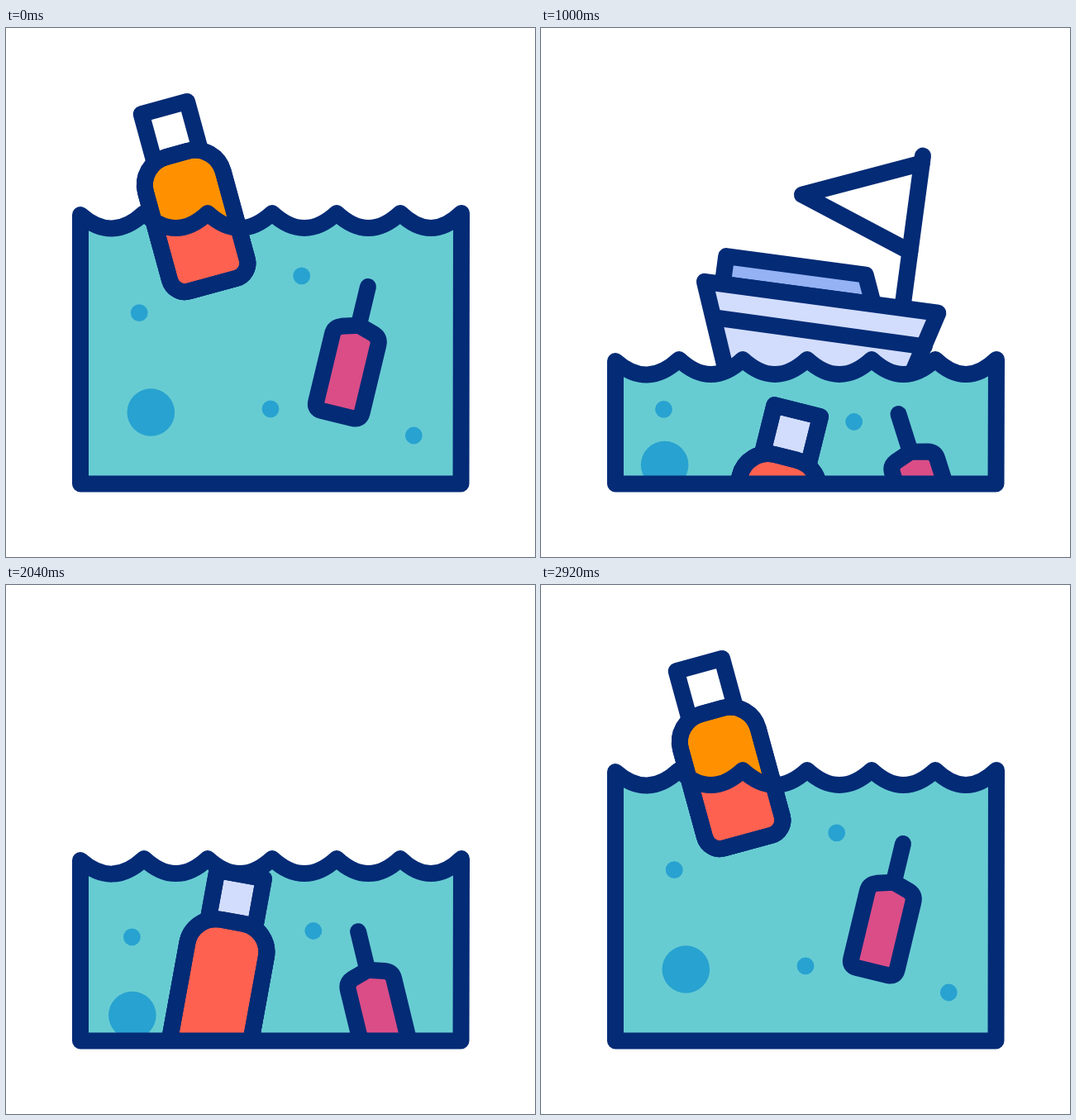
Write an HTML page with a canvas that moves like this. It is 640 px wide and 640 px high and loops after 3000 ms.

```html
<!DOCTYPE html>
<html lang="en">
<head>
<meta charset="utf-8">
<title>Tide</title>
<style>
  html, body { margin: 0; height: 100%; overflow: hidden; background: #fff; }
  canvas { display: block; width: 640px; height: 640px; }
</style>
</head>
<body>
<canvas id="stage" width="640" height="640"></canvas>
<script>
const ctx = document.getElementById('stage').getContext('2d');
const NAVY = '#032b76', WATER = '#67ccd2', BUBBLE = '#28a2d0', PALE = '#d2ddfd',
      CABIN = '#94b2f4', ORANGE = '#ff9100', RED = '#ff6150', PINK = '#db4d87';
const LOOP = 3000, STEP = 40, FLOOR = 551.5;
const CRESTS = [90, 167, 244, 322, 400, 477, 551];

const mix = (a, b, p) => a + (b - a) * p;

function ease(t, from, to) {
  const u = Math.min(1, Math.max(0, (t - from) / (to - from)));
  return u * u * (3 - 2 * u);
}

// 0 at rest, 1 once sunk, 0 again after rising
const dip = (t, down, sunk, up, back) => ease(t, down, sunk) - ease(t, up, back);

function line(points) {
  const path = new Path2D();
  points.forEach(([x, y]) => path.lineTo(x, y));
  return path;
}

function closed(points) {
  const path = line(points);
  path.closePath();
  return path;
}

// Bottle around its pivot
const body = new Path2D();
body.roundRect(-48.5, -47.6, 97, 164, [35, 35, 19, 19]);
const neck = line([[-28.7, -47.6], [-28.7, -105.6], [28.7, -105.6], [28.7, -47.6]]);

// Small bottle with a stick, around its pivot
const stick = line([[0, -83], [0, -35]]);
const vial = new Path2D('M0-35L-20-29Q-28.5-26-28.5-17V67Q-28.5 76-19.5 76H19.5Q28.5 76 28.5 67V-17Q28.5-26 20-29Z');

const hull = closed([[186, 331], [471, 331], [438, 450], [232, 450]]);
const band = line([[204, 372.5], [460, 373.5]]);
const cabin = closed([[208, 331], [208, 297], [378, 297], [392, 331]]);
const mast = line([[427.5, 145], [427.5, 331]]);
const flag = line([[427.5, 154], [289, 211], [427.5, 262]]);

function tank(level) {
  const path = new Path2D();
  path.moveTo(90, level + 2);
  CRESTS.slice(1).forEach((x, i) => {
    path.quadraticCurveTo((CRESTS[i] + x) / 2, level + 36, x, level);
  });
  path.lineTo(550.5, FLOOR);
  path.lineTo(90, FLOOR);
  path.closePath();
  return path;
}

function shape(path, fill) {
  if (fill) {
    ctx.fillStyle = fill;
    ctx.fill(path);
  }
  ctx.stroke(path);
}

function placed(x, y, degrees, draw) {
  ctx.save();
  ctx.translate(x, y);
  ctx.rotate(degrees * Math.PI / 180);
  draw();
  ctx.restore();
}

function clipped(path, draw) {
  ctx.save();
  ctx.clip(path);
  draw();
  ctx.restore();
}

function drawBoat(t) {
  const rise = dip(t, 200, 840, 1766, 2428);
  const rock = t < 980 ? 7.85 * ease(t, 200, 840)
    : 1.65 + 6.2 * Math.cos((Math.min(t, 1942) - 980) / 481 * 2 * Math.PI);
  placed(328, 405 + 675 * (1 - rise), rock, () => {
    ctx.translate(-328, -411);
    shape(mast);
    shape(flag);
    shape(cabin, CABIN);
    shape(hull, PALE);
    shape(band);
  });
}

function drawBubble(x, y, r) {
  ctx.fillStyle = BUBBLE;
  ctx.beginPath();
  ctx.arc(x, y, r, 0, 2 * Math.PI);
  ctx.fill();
}

function drawBubbles(t, sink) {
  const big = dip(t, 250, 777, 1790, 2920);
  const near = dip(t, 169, 758, 1762, 2487);
  const low = dip(t, 169, 758, 1840, 2620);
  drawBubble(mix(175.3, 149.6, big), mix(465, 528.5, big), 28.8);
  drawBubble(mix(161.2, 148.5, sink), mix(344.7, 461.3, sink), 10.4);
  drawBubble(mix(357.7, 378.7, near), mix(299.8, 476.5, near), 10.4);
  drawBubble(320 - 6 * low, 460.8 + 150 * low, 10.4);
  drawBubble(493.3 - 6 * low, 493 + 150 * low, 10.4);
}

function drawBottles(sea, sink, turn) {
  const bottle = draw =>
    placed(mix(219.2, 284.7, sink), mix(198.4, 565.6, sink), mix(-15.3, 14, turn), draw);
  bottle(() => shape(body, ORANGE));
  clipped(sea, () => bottle(() => {
    shape(neck, PALE);
    shape(body, RED);
  }));
  bottle(() => {
    shape(neck);
    shape(body);
  });
  placed(mix(418.6, 457.4, sink), mix(393.7, 546.2, sink), mix(13.5, -17.5, turn), () => {
    shape(vial, PINK);
    shape(stick);
  });
}

const aboveFloor = new Path2D();
aboveFloor.rect(0, 0, 640, FLOOR);

function render(t) {
  const sea = tank(mix(224, 401, dip(t, 140, 727, 1748, 2428)));
  const sink = dip(t, 205, 832, 1790, 2473);
  const turn = dip(t, 205, 832, 1790, 2920);

  ctx.clearRect(0, 0, 640, 640);
  ctx.lineWidth = 20;
  ctx.lineCap = ctx.lineJoin = 'round';
  ctx.strokeStyle = NAVY;

  clipped(aboveFloor, () => {
    drawBoat(t);
    ctx.fillStyle = WATER;
    ctx.fill(sea);
    clipped(sea, () => drawBubbles(t, sink));
    drawBottles(sea, sink, turn);
  });
  ctx.stroke(sea);
}

const start = performance.now();
function tick() {
  const t = (performance.now() - start) % LOOP;
  render(Math.floor(t / STEP) * STEP);
  requestAnimationFrame(tick);
}
tick();
</script>
</body>
</html>
```
